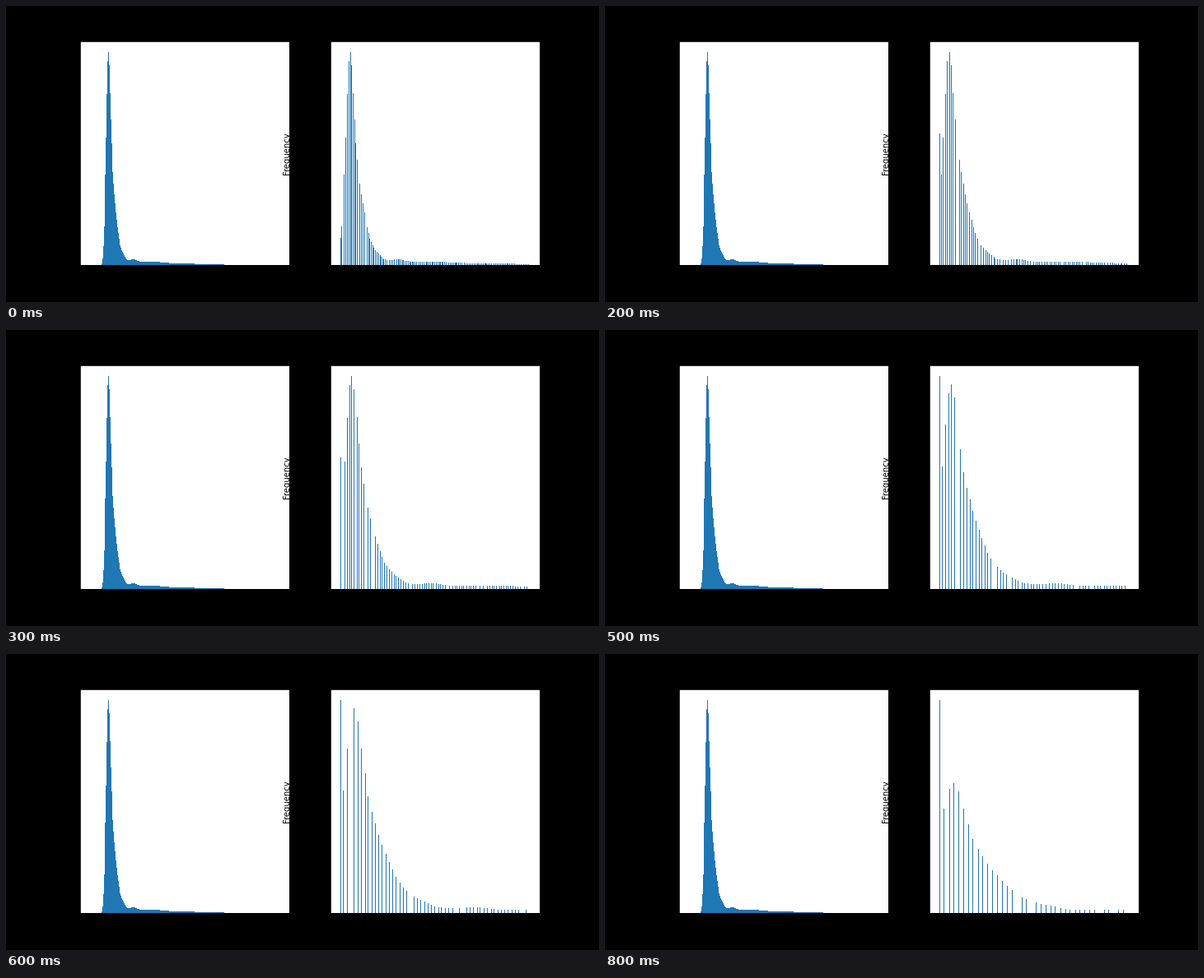
These frames come from a looping animation (720x360 px, 900 ms). A matplotlib script:

```python
import numpy as np
import matplotlib.pyplot as plt
from matplotlib.animation import FuncAnimation

FRAMES = 9
LEVELS = np.arange(256)
PEAK = 25  # brightness level with the highest count

# Key points of the histogram: (offset from the peak, count)
KEYS = [(-9, 2), (-8, 8), (-5, 79), (-4, 110), (-2, 208), (-1, 248), (0, 259),
        (1, 243), (4, 148), (5, 128), (8, 86), (12, 46), (14, 32), (17, 20.6),
        (21, 12.4), (23, 8), (26, 6.2), (30, 6.2), (32, 7), (36, 7),
        (42, 4.1), (66, 3.8), (89, 2), (126, 1.35), (157, 0.5), (190, 0)]


def make_counts():
    """Join the key points with curves that are straight in sqrt(count)."""
    offset, count = np.transpose(KEYS)
    return np.interp(LEVELS - PEAK, offset, np.sqrt(count), left=0) ** 2


def stretch(counts, cut):
    """Histogram after a linear stretch that clips a share at both ends."""
    share = np.cumsum(counts) / counts.sum()
    low, high = np.searchsorted(share, [cut, 1 - cut])
    pos = np.clip(LEVELS, low, high) - low
    return np.bincount(255 * pos // (high - low), counts, minlength=256)


def make_bars(ax):
    step = 255 / 256
    bars = ax.bar(LEVELS * step, np.zeros(256), width=step, align="edge",
                  color="#1f77b4")
    ax.set_xlim(-12.75, 267.75)
    ax.set_xticks([])
    ax.set_yticks([])
    return bars


def show(ax, bars, counts):
    for bar, count in zip(bars, counts):
        bar.set_height(count)
    ax.set_ylim(0, 1.05 * counts.max())


plt.rcParams["font.family"] = "DejaVu Sans"
fig, (left, right) = plt.subplots(1, 2, figsize=(10, 5), dpi=72,
                                  facecolor="black")
fig.subplots_adjust(left=0.125, right=0.9, bottom=0.125, top=0.88, wspace=0.2)

counts = make_counts()
left_bars = make_bars(left)
right_bars = make_bars(right)
show(left, left_bars, counts)
right.set_ylabel("Frequency", fontsize=10)
right.yaxis.set_label_coords(-0.19, 0.5)


def update(i):
    show(right, right_bars, stretch(counts, (i + 1) / 100))
    return list(right_bars)


anim = FuncAnimation(fig, update, frames=FRAMES, interval=100,
                     init_func=lambda: update(0), repeat=True, repeat_delay=0)
plt.show()
```
